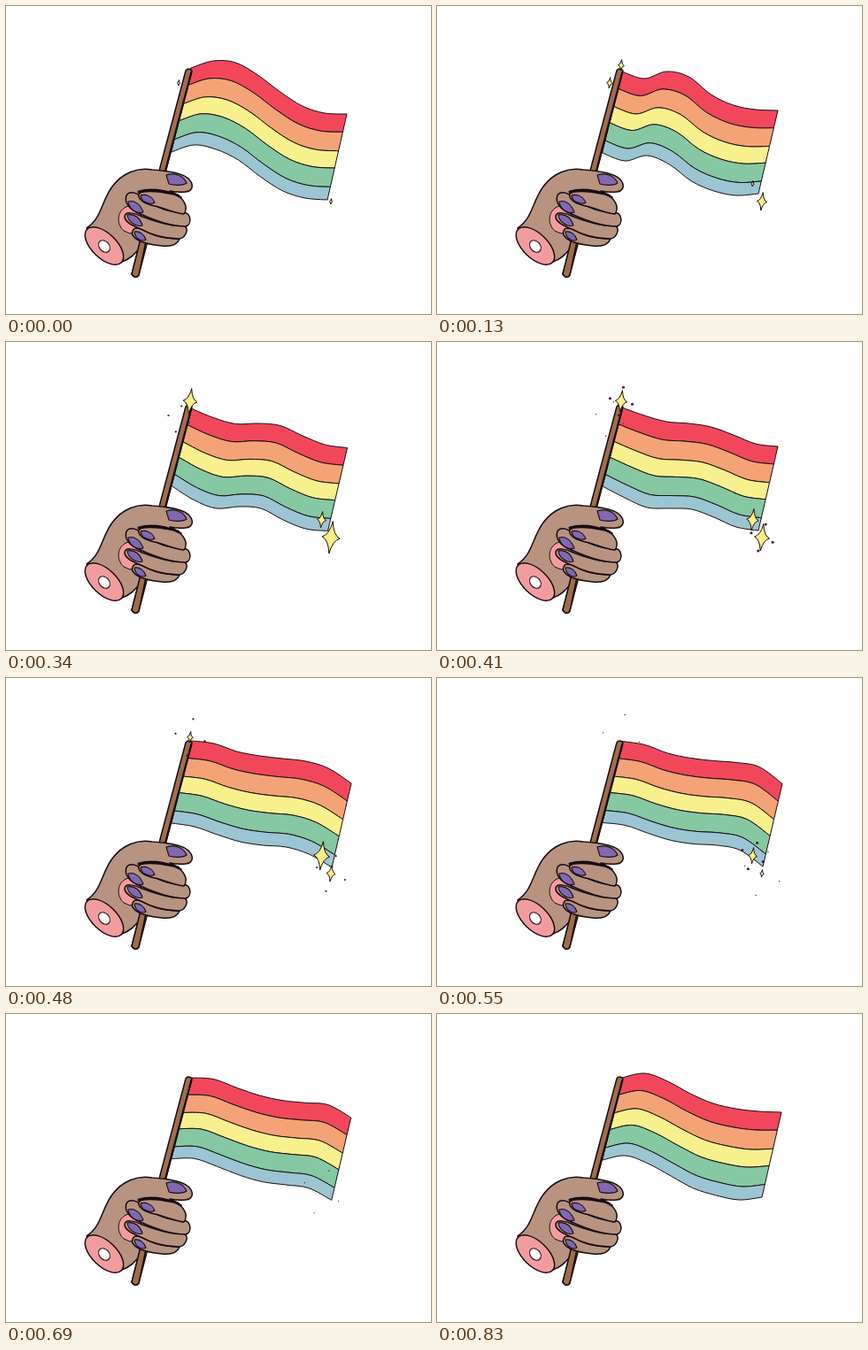
Animation, 480 px wide and 348 px high, one loop 890 ms. Source, as an HTML page:

```html
<!DOCTYPE html>
<html lang="en">
<head>
<meta charset="utf-8">
<title>Waving rainbow flag</title>
<style>
  html, body { margin: 0; width: 100%; height: 100%; overflow: hidden; background: #fff; }
  svg { display: block; width: 100vw; height: 100vh; }
  path, ellipse { stroke: #160d12; stroke-linejoin: round; stroke-linecap: round; }
  #flag path { stroke-width: 1; }
  #hand { stroke-width: 1.5; }
  .skin { fill: #b8937f; }
  .nail { fill: #8068b5; stroke-width: 1.1; }
  .pink { fill: #f39c9d; }
  .wood { fill: #a16d4c; stroke-width: 1.5; }
  #stars path { fill: #f9ee83; stroke-width: 1; }
  #dots circle { fill: #4a0d35; }
</style>
</head>
<body>
<svg viewBox="0 0 480 348">
  <g id="flag"></g>
  <path class="wood" d="M203 73Q206 69 210 73L150 304Q146 309 142 303Z"/>
  <path d="M209.3 75L179 190" fill="none" stroke-width="2.2"/>
  <g id="hand">
    <path class="skin" d="M91 251C108 240 107 222 120 204C131 189 148 182 165 185C180 186 198 188 206 195C213 202 211 209 203 210C196 211 190 210 185 209L198 216L200 260L157 268C150 272 146 284 131 289Z"/>
    <path class="wood" d="M152 263L158 266L150 304Q146 309 142 303Z"/>
    <path d="M150 210C164 206 180 209 194 214" fill="none" stroke-width="3"/>
    <path class="pink" d="M138 226C125 230 124 246 133 254Q139 258 146 257L152 236Z" stroke-width="1"/>
    <path class="skin" d="M143 254C146 247 158 254 168 259C178 262 188 263 196 263C193 271 185 272 176 271C166 270 156 268 150 265C145 262 141 258 143 254Z"/>
    <path class="skin" d="M134 238C134 231 146 234 154 238C170 244 188 250 201 248C208 252 202 263 195 263C180 263 165 259 152 252C142 248 134 244 134 238Z"/>
    <path class="skin" d="M136 214C140 207 150 212 158 220C170 227 185 234 200 233C210 234 210 247 203 249C185 249 165 241 152 235C140 231 133 222 136 214Z"/>
    <path class="skin" d="M150 212C158 207 180 211 190 213C202 217 206 228 201 235C190 234 178 228 168 226C158 224 148 219 150 212Z"/>
    <path class="nail" d="M181 191C190 188 200 191 204 200C200 203 190 203 184 201Z"/>
    <path class="nail" d="M152 214C158 212 165 215 168 222C163 225 153 222 152 214Z"/>
    <path class="nail" d="M138 221C145 219 152 224 155 233C148 235 139 230 138 221Z"/>
    <path class="nail" d="M137 236C145 234 152 240 154 248C147 250 138 244 137 236Z"/>
    <path class="nail" d="M145 255C151 254 156 258 158 264C152 267 146 262 145 255Z"/>
    <ellipse class="pink" cx="111" cy="271" rx="27" ry="14" transform="rotate(44 111 271)"/>
    <ellipse cx="111" cy="271.5" rx="7.5" ry="5.6" fill="#fff" stroke-width="1" transform="rotate(50 111 271.5)"/>
  </g>
  <g id="stars"></g>
  <g id="dots"></g>
</svg>
<script>
const LOOP = 890, COLS = 7;
const COLORS = ['#f2475b', '#f4a376', '#f8f08c', '#86c8a1', '#9bc5d2'];
const BANDS = [0, 0.21, 0.43, 0.63, 0.85, 1];

// Flag poses: step, right edge x, heights along the top and bottom edges
const POSES = [
  { at: 0, x: 385, top: [70, 62, 64, 78, 97, 113, 121, 122], low: [165, 157, 162, 174, 193, 209, 217, 219] },
  { at: 2, x: 385, top: [74, 82, 74, 80, 100, 112, 117, 118], low: [166, 175, 169, 179, 198, 209, 214, 212] },
  { at: 4, x: 386, top: [76, 88, 95, 92, 93, 107, 117, 121], low: [162, 181, 189, 184, 187, 204, 213, 214] },
  { at: 6, x: 385, top: [74, 83, 90, 92, 96, 105, 115, 118], low: [163, 176, 187, 188, 189, 198, 209, 213] },
  { at: 7, x: 390, top: [71, 74, 83, 88, 91, 94, 102, 119], low: [164, 168, 177, 185, 189, 191, 199, 214] },
  { at: 9, x: 390, top: [72, 77, 87, 93, 96, 97, 99, 120], low: [163, 165, 174, 182, 186, 187, 190, 212] },
  { at: 12, x: 389, top: [72, 67, 76, 90, 101, 107, 110, 111], low: [165, 160, 169, 183, 197, 205, 210, 207] }
];

// Star sizes per step, followed by a short burst of specks
const STARS = [
  { x: 208, y: 67, size: [0, 2, 6, 10, 14, 14, 12, 6], burst: 6 },
  { x: 195, y: 87, size: [3, 4, 6, 7, 6], burst: 4 },
  { x: 367, y: 221, size: [3, 6, 10, 16, 20, 18, 15, 9, 4], burst: 6 },
  { x: 356.5, y: 201, size: [0, 0, 3, 5, 7, 9, 12, 16, 9], burst: 8 }
];

const make = (tag, parent) =>
  document.getElementById(parent).appendChild(document.createElementNS('http://www.w3.org/2000/svg', tag));
const bands = COLORS.map(c => {
  const p = make('path', 'flag');
  p.setAttribute('fill', c);
  return p;
});
const stars = STARS.map(() => make('path', 'stars'));
const dots = STARS.map(() => [0, 1, 2, 3].map(() => make('circle', 'dots')));

const mix = (a, b, k) => a + (b - a) * k;
const pt = p => p[0].toFixed(2) + ' ' + p[1].toFixed(2);

function poseAt(step) {
  const i = Math.max(1, POSES.findIndex(p => p.at >= step));
  const a = POSES[i - 1], b = POSES[i], k = (step - a.at) / (b.at - a.at);
  const blend = key => a[key].map((y, j) => mix(y, b[key][j], k));
  return { x: mix(a.x, b.x, k), top: blend('top'), low: blend('low') };
}

function edge(pose, f) {
  return pose.top.map((y, j) =>
    [mix(209, pose.x, j / COLS) - 22 * f, mix(y, pose.low[j], f)]);
}

function smooth(pts) {
  let d = pt(pts[0]);
  for (let i = 0; i < pts.length - 1; i++) {
    const a = pts[i - 1] || pts[i], b = pts[i], c = pts[i + 1], e = pts[i + 2] || c;
    d += 'C' + [[0, 1].map(n => b[n] + (c[n] - a[n]) / 6), [0, 1].map(n => c[n] - (e[n] - b[n]) / 6), c].map(pt).join(' ');
  }
  return d;
}

function starPath(x, y, r) {
  if (!r) return '';
  const w = r * 0.56, q = r * 0.14;
  const tip = (u, v) => pt([x + u - v * 0.12, y + v + u * 0.12]);
  return `M${tip(0, -r)}Q${tip(q, -q)} ${tip(w, 0)}Q${tip(q, q)} ${tip(0, r)}Q${tip(-q, q)} ${tip(-w, 0)}Q${tip(-q, -q)} ${tip(0, -r)}Z`;
}

function draw(step) {
  const pose = poseAt(step);
  const lines = BANDS.map(f => edge(pose, f));
  bands.forEach((p, i) =>
    p.setAttribute('d', 'M' + smooth(lines[i]) + 'L' + smooth(lines[i + 1].slice().reverse()) + 'Z'));

  STARS.forEach((s, i) => {
    stars[i].setAttribute('d', starPath(s.x, s.y, s.size[step] || 0));
    const age = step - s.burst, on = age >= 0 && age <= 2;
    const dist = (s.burst === 4 ? 10 : 16) + 5 * age;
    dots[i].forEach((c, n) => {
      const a = n * Math.PI / 2 + 0.2 + i * 0.07;
      c.setAttribute('cx', s.x + Math.cos(a) * dist * 0.8);
      c.setAttribute('cy', s.y + Math.sin(a) * dist);
      c.setAttribute('r', on ? 1.5 - 0.4 * age : 0);
    });
  });
}

let last = -1;
function tick() {
  const t = performance.now() % LOOP;
  const step = t < 60 ? 0 : 1 + Math.floor((t - 60) / 70);
  if (step !== last) draw(last = step);
  requestAnimationFrame(tick);
}
tick();
</script>
</body>
</html>
```
